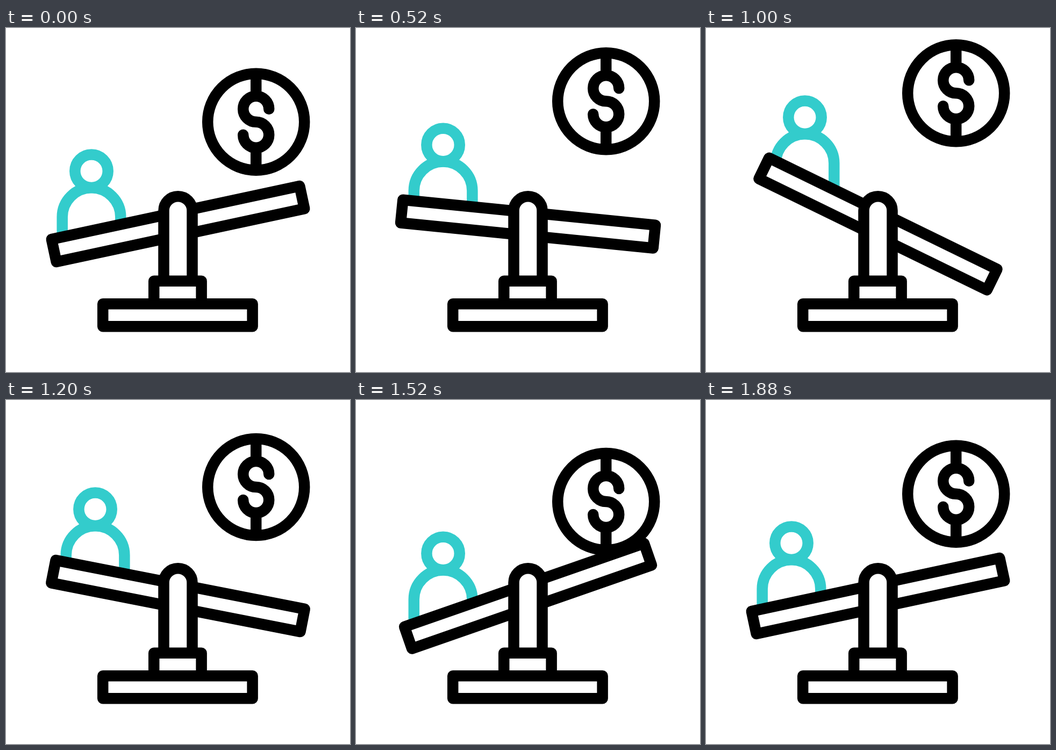
An HTML page with a canvas for the animation above (2 s loop, 640 by 640 pixels).

```html
<!DOCTYPE html>
<html lang="en">
<head>
<meta charset="utf-8">
<title>Seesaw balance</title>
<style>
html, body { margin: 0; width: 100%; height: 100%; overflow: hidden; background: #fff; }
canvas { display: block; width: 100vmin; height: 100vmin; }
</style>
</head>
<body>
<canvas id="stage" width="640" height="640"></canvas>
<script>
const ctx = document.getElementById('stage').getContext('2d');
const LOOP = 2000, STEP = 40;
const INK = '#000', TEAL = '#33cccc';
const PIVOT = { x: 320, y: 364.6 };

// [time in ms, value], eased in and out between neighbours
const TILT = [[80, -12.1], [1000, 26], [1520, -19.2], [1880, -12.1]];
const COIN_Y = [[40, 174.7], [880, 111.2], [1420, 191], [1880, 174.7]];

function valueAt(keys, t) {
  if (t <= keys[0][0]) return keys[0][1];
  for (let i = 1; i < keys.length; i++) {
    const [t0, a] = keys[i - 1], [t1, b] = keys[i];
    if (t <= t1) {
      const u = (t - t0) / (t1 - t0);
      return a + (b - a) * u * u * (3 - 2 * u);
    }
  }
  return keys[keys.length - 1][1];
}

function outline(draw, color = INK, fill = false, cap = 'round') {
  ctx.beginPath();
  draw();
  if (fill) {
    ctx.fillStyle = '#fff';
    ctx.fill();
  }
  ctx.strokeStyle = color;
  ctx.lineCap = cap;
  ctx.stroke();
}

function line(x0, y0, x1, y1) {
  ctx.moveTo(x0, y0);
  ctx.lineTo(x1, y1);
}

function drawCoin(y) {
  ctx.save();
  ctx.translate(465.2, y);
  outline(() => ctx.arc(0, 0, 90, 0, Math.PI * 2));
  outline(() => {
    ctx.arc(0, -24, 24, 0, Math.PI / 2, true);
    ctx.arc(0, 24, 24, -Math.PI / 2, Math.PI);
  });
  outline(() => {
    line(0, -90, 0, -48);
    line(0, 48, 0, 90);
  }, INK, false, 'butt');
  ctx.restore();
}

// Stays upright while its footing follows the plank
function drawPerson(angle) {
  const c = Math.cos(angle), s = Math.sin(angle);
  ctx.save();
  ctx.translate(PIVOT.x - 160.6 * c + 19 * s, PIVOT.y - 156.6 * s - 19 * c - 112.6);
  outline(() => ctx.arc(0, 0, 30.7, 0, Math.PI * 2), TEAL);
  outline(() => {
    ctx.moveTo(-54.3, 130);
    ctx.arc(0, 85.3, 54.3, Math.PI, 0);
    ctx.lineTo(54.3, 130);
  }, TEAL, false, 'butt');
  ctx.restore();
}

function drawPlank(angle) {
  ctx.save();
  ctx.translate(PIVOT.x, PIVOT.y);
  ctx.rotate(angle);
  outline(() => ctx.rect(-236, -21.5, 472, 43), INK, true);
  ctx.restore();
}

function drawStand() {
  outline(() => {
    ctx.moveTo(293.5, 470.5);
    ctx.arc(320, 339.7, 26.5, Math.PI, 0);
    ctx.lineTo(346.5, 470.5);
  }, INK, true);
  outline(() => ctx.rect(275.2, 470.7, 88.4, 42.5), INK, true);
  outline(() => ctx.rect(180.2, 513.2, 278.4, 42), INK, true);
}

function frame(now) {
  const t = Math.floor((now % LOOP) / STEP) * STEP;
  const angle = valueAt(TILT, t) * Math.PI / 180;
  ctx.fillStyle = '#fff';
  ctx.fillRect(0, 0, 640, 640);
  ctx.lineWidth = 20.5;
  ctx.lineJoin = 'round';
  drawCoin(valueAt(COIN_Y, t));
  drawPerson(angle);
  drawPlank(angle);
  drawStand();
}

const start = performance.now();
function tick() {
  frame(performance.now() - start);
  requestAnimationFrame(tick);
}
tick();
</script>
</body>
</html>
```
